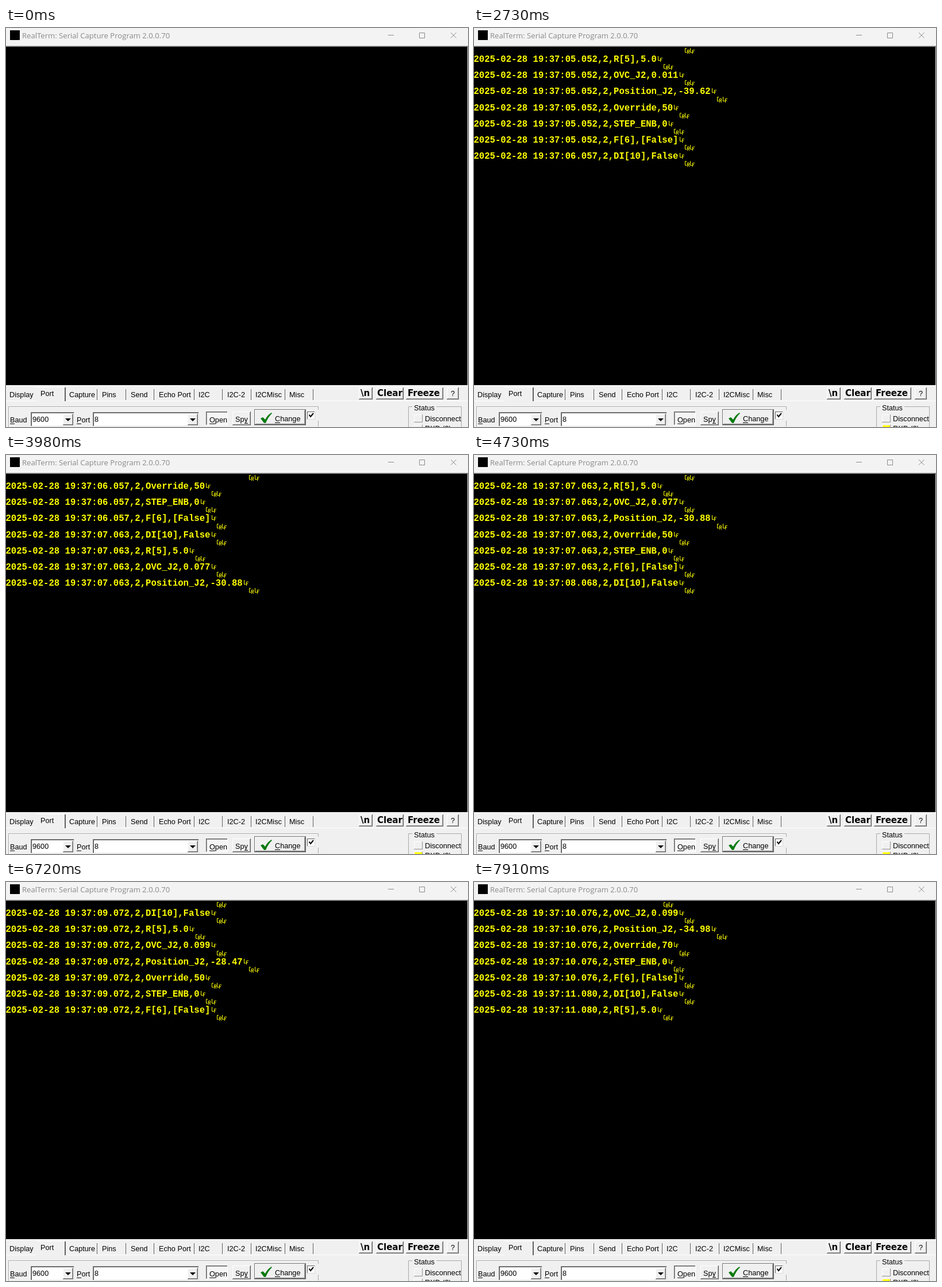
Recreate the animation shown at these times as an HTML page with a canvas. Size 804x696 px, loop 8 s.

```html
<!DOCTYPE html>
<html lang="en">
<head>
<meta charset="utf-8">
<title>Serial terminal</title>
<style>
  html, body { margin: 0; width: 804px; height: 696px; overflow: hidden; background: #f0f0f0; }
  canvas { display: block; }
</style>
</head>
<body>
<canvas id="stage" width="804" height="696"></canvas>
<script>
const ctx = document.getElementById('stage').getContext('2d');
const LOOP = 8000, CELL = 9.37, ROW = 14.09, ROWS = 16;
const UI = '12.7px "Liberation Sans", Arial, sans-serif';
const BOLD = 'bold 15px "DejaVu Sans", sans-serif';
const MONO = `bold ${CELL / 0.6001}px "Liberation Mono", monospace`;

// Serial messages: each log record ends in LF and is followed by CR LF.
const messages = [
  'USB storage initialized\r\n',
  'Bytes in file: 0\r\n',
  'New client connected IP: 192.168.0.100\r\n',
  'Timestamp,Device_ID,Data_Type,Value\n\r\n'
];
const samples = [
  ['05.052', '0.011', '-39.62', 50],
  ['06.057', '0.033', '-35.46', 50],
  ['07.063', '0.077', '-30.88', 50],
  ['08.068', '0.099', '-26.65', 50],
  ['09.072', '0.099', '-28.47', 50],
  ['10.076', '0.099', '-34.98', 70],
  ['11.080', '0.099', '-38.20', 70]
];
for (const [sec, ovc, position, override] of samples) {
  const fields = ['DI[10],False', 'R[5],5.0', `OVC_J2,${ovc}`, `Position_J2,${position}`,
    `Override,${override}`, 'STEP_ENB,0', 'F[6],[False]'];
  for (const field of fields) messages.push(`2025-02-28 19:37:${sec},2,${field}\n\r\n`);
}

// Arrivals: [time, complete messages, characters of the next one].
const arrivals = [[0, 0, 0]];
const arrive = (time, count, extra = 0) => arrivals.push([time, count, extra]);
const burst = (time, step, first, last) => {
  for (let n = first; n <= last; n++) arrive(time + (n - first) * step, n);
};
burst(400, 95, 1, 3);
arrive(1790, 3, 36);
burst(1860, 94, 5, 8);
arrive(2240, 10);
arrive(2330, 11);
burst(2730, 94, 12, 13);
burst(2918, 94, 15, 18);
arrive(3730, 19, 14);
arrive(3920, 21, 20);
arrive(3980, 22);
arrive(4130, 24, 12);
arrive(4180, 25);
arrive(4730, 26);
burst(4930, 80, 27, 32);
burst(5790, 78.3, 33, 39);
burst(6790, 80, 40, 46);
burst(7820, 90, 47, 48);

function stateAt(time) {
  let i = arrivals.length - 1;
  while (arrivals[i][0] > time) i--;
  const [start, count, extra] = arrivals[i];
  const next = i + 1 < arrivals.length ? arrivals[i + 1][0] : LOOP;
  const text = messages.slice(0, count).join('') + messages[count].slice(0, extra);
  return { text, receiving: i > 0 && next - start < 250 };
}

function rect(x, y, w, h, color) {
  ctx.fillStyle = color;
  ctx.fillRect(x, y, w, h);
}

function write(text, x, y, font = UI, color = '#000') {
  ctx.font = font;
  ctx.fillStyle = color;
  ctx.fillText(text, x, y);
}

function label(text, x, y, key) {
  write(text, x, y);
  const left = x + ctx.measureText(text.slice(0, key)).width;
  rect(Math.round(left), y + 2, Math.round(ctx.measureText(text[key]).width), 1, '#000');
}

function stroke(d, color, width = 1) {
  ctx.strokeStyle = color;
  ctx.lineWidth = width;
  ctx.stroke(new Path2D(d));
}

function fill(d, color) {
  ctx.fillStyle = color;
  ctx.fill(new Path2D(d));
}

function bevel(x, y, w, h, light, dark, face = '#f0f0f0') {
  rect(x, y, w, h, dark);
  rect(x, y, w - 1, h - 1, light);
  rect(x + 1, y + 1, w - 2, h - 2, face);
}

function button(x, y, w, h) {
  bevel(x, y, w, h, '#fff', '#606060', '#a0a0a0');
  rect(x + 1, y + 1, w - 3, h - 3, '#f0f0f0');
}

function combo(x, w, value) {
  bevel(x, 670, w, 25, '#808080', '#e0e0e0', '#555');
  rect(x + 2, 672, w - 3, 22, '#fff');
  write(value, x + 3, 687);
  button(x + w - 20, 673, 18, 20);
  fill(`M${x + w - 16} 681h10l-5 5z`, '#000');
}

function titleBar() {
  rect(0, 0, 804, 31, '#f3f3f3');
  rect(0, 31, 804, 1, '#a0a0a0');
  rect(0, 32, 804, 1, '#696969');
  rect(7, 4, 17, 17, '#000');
  write('RealTerm: Serial Capture Program 2.0.0.70', 28, 18, '13.1px "Open Sans", sans-serif', '#8a8a8a');
  stroke('M665 12.5h10M719.5 8.5h9v9h-9zM774 8l9.5 9.5M783.5 8L774 17.5', '#8a8a8a');
}

function controlGlyph(code, x, y) {
  const shape = code === '\r'
    ? 'M4 .5H1.5V7.5H4M5.5 10V3.5H8.5V6.5H5.5M7.5 6.5L8.5 10'
    : 'M1.5 0V7.5H4.5M5.5 10V3.5H9M5.5 6.5H8';
  ctx.save();
  ctx.translate(Math.round(x + 0.7), Math.round(y));
  stroke(shape, '#ff0');
  ctx.restore();
}

// LF alone keeps the column; CR LF returns to the left edge.
function layout(text) {
  const rows = [];
  let column = 0;
  for (const part of text.split(/(?<=\n)/)) {
    const body = part.replace(/[\r\n]/g, '');
    const codes = part.slice(body.length);
    rows.push({ column, body, codes });
    column = codes === '\n' ? column + body.length + 1 : 0;
  }
  if (text.endsWith('\n')) rows.push({ column, body: '', codes: '' });
  return rows.slice(-ROWS);
}

function terminal(text) {
  rect(0, 33, 803, 590, '#000');
  rect(803, 33, 1, 590, '#e3e3e3');
  layout(text).forEach(({ column, body, codes }, i) => {
    const top = 35 + i * ROW;
    write(body, column * CELL - 0.5, Math.round(top + 10), MONO, '#ff0');
    [...codes].forEach((code, n) =>
      controlGlyph(code, (column + body.length + n) * CELL, top));
  });
}

function tabs() {
  rect(0, 623, 804, 73, '#f0f0f0');
  rect(0, 623, 804, 1, '#fff');
  rect(0, 650, 804, 1, '#fff');
  rect(53, 627, 51, 24, '#f0f0f0');
  rect(53, 626, 50, 1, '#fff');
  rect(102, 627, 2, 24, '#606060');
  for (const x of [158, 208, 257, 327, 376, 426, 485, 534]) rect(x, 630, 1, 19, '#606060');
  write('Port', 60, 642);
  const names = { Display: 6, Capture: 110, Pins: 167, Send: 217, 'Echo Port': 266,
    I2C: 335, 'I2C-2': 385, I2CMisc: 434, Misc: 493 };
  for (const name in names) write(name, names[name], 644);

  button(614, 627, 24, 21);
  button(644, 627, 48, 21);
  button(696, 627, 65, 21);
  button(767, 627, 21, 21);
  write('\\n', 617, 642, BOLD);
  write('Clear', 646, 642, BOLD);
  write('Freeze', 699, 642, BOLD);
  write('?', 774, 642);
}

function portPanel() {
  stroke('M4.5 696V660.5H543.5V666M543.5 685V695', '#a8a8a8');
  stroke('M5.5 696V661.5H542', '#fff');
  label('Baud', 7, 688, 0);
  combo(43, 76, '9600');
  label('Port', 123, 688, 0);
  combo(151, 185, '8');

  bevel(348, 669, 38, 24, '#606060', '#fff', '#a0a0a0');
  rect(350, 671, 35, 21, '#f5f5f5');
  label('Open', 354, 688, 0);
  button(394, 669, 32, 24);
  label('Spy', 399, 687, 2);
  rect(432, 665, 90, 28, '#707070');
  button(433, 666, 88, 26);
  fill('M443 681l4-2 4 4q4-8 11-12l1 1q-7 7-11 17h-3z', '#087a10');
  label('Change', 468, 686, 0);

  bevel(524, 669, 14, 14, '#606060', '#d8d8d8', '#fff');
  stroke('M527.5 674.5l2.5 3.5 5-6', '#000', 2);
}

function statusPanel(receiving) {
  stroke('M707 660.5H700.5V696M749 660.5H792.5V696', '#a8a8a8');
  write('Status', 710, 667);
  bevel(710, 674, 15, 14, '#fff', '#909090');
  bevel(710, 692, 15, 14, '#fff', '#909090', receiving ? '#ff0' : '#f0f0f0');
  ctx.save();
  ctx.beginPath();
  ctx.rect(725, 670, 67, 26);
  ctx.clip();
  write('Disconnect', 729, 686);
  write('RXD (2)', 729, 703);
  ctx.restore();
}

const origin = performance.now();

function draw() {
  const { text, receiving } = stateAt((performance.now() - origin) % LOOP);
  titleBar();
  terminal(text);
  tabs();
  portPanel();
  statusPanel(receiving);
  requestAnimationFrame(draw);
}
draw();
</script>
</body>
</html>
```
